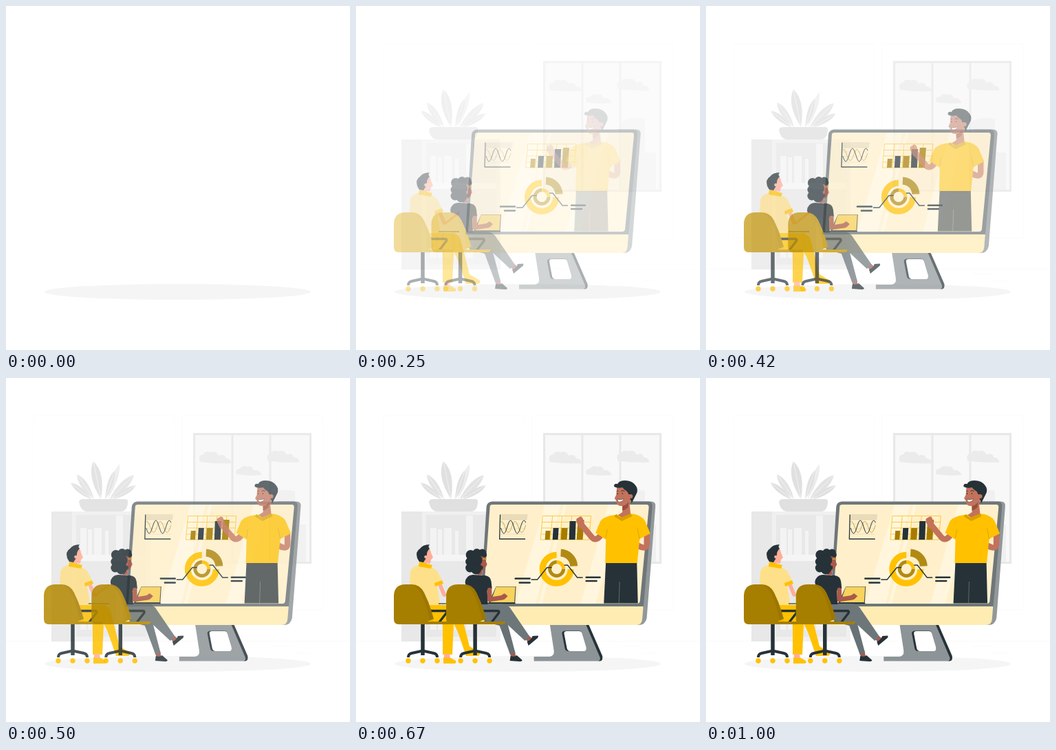
Write an HTML page that moves like this. It is 500x500 px and loops after 1040 ms.

```html
<!DOCTYPE html>
<html lang="en">
<head>
<meta charset="utf-8">
<title>Online presentation</title>
<style>
  html, body { margin: 0; width: 100%; height: 100%; overflow: hidden; background: #fff; }
  svg { display: block; width: 100%; height: 100%; }
  .line { fill: none; stroke-linecap: round; stroke-linejoin: round; }
  .ink { fill: #263238; }
  .inkLine { fill: none; stroke: #263238; stroke-linejoin: round; }
  .sun { fill: #ffc100; }
  .gold { fill: #a67c00; }
</style>
</head>
<body>
<svg viewBox="0 0 500 500">
  <defs>
    <path id="chairBody" d="M104 354H141Q141 358 136 358H62Q55 358 55 350V316Q56 300 72 300H81Q93 300 99 312Q106 326 110 340L113 350Z"/>
    <g id="chair">
      <path class="inkLine" stroke-width="5.5" d="M97 356V403"/>
      <path class="inkLine" stroke-width="4" d="M76 406Q76 401 81 400L97 396.500L113 400Q118 401 118 406"/>
      <g class="sun"><circle cx="76" cy="411" r="3.7"/><circle cx="97" cy="411" r="3.7"/><circle cx="118" cy="411" r="3.7"/></g>
      <path class="inkLine" stroke-width="3.4" d="M104 338.500H130Q133 339 131 342L121 355"/>
      <use href="#chairBody" class="sun"/>
      <g class="shade" fill-opacity=".35">
        <use href="#chairBody"/>
        <path fill-opacity=".06" d="M80 300Q93 300 99 312Q106 326 110 340L113 350V354H108Q100 320 92 309Q87 302 80 300Z"/>
      </g>
    </g>
  </defs>

  <ellipse cx="249.500" cy="415.500" rx="193.500" ry="11.500" fill="#f5f5f5"/>

  <g id="room">
    <g fill="none" stroke="#ebebeb" stroke-width=".25">
      <path d="M0 382.500H500M388 389.500H413M416 400H442"/>
      <path d="M40 337V55H245V337ZM256 337V55H461V337Z"/>
    </g>
    <rect x="273.500" y="81.500" width="169" height="187" fill="#f8f8f8" stroke="#e8e8e8" stroke-width="3.200"/>
    <path fill="#f0f0f0" d="M386 267V168Q398 160 420 164V213H436V267Z"/>
    <path stroke="#e8e8e8" stroke-width="3" d="M329 82V268M384 82V268"/>
    <g fill="#ebebeb">
      <path id="cloud" d="M282 122Q278 112 287 111Q290 105 297 108Q306 105 309 113Q318 109 320 117Q327 117 328 124Q305 125 282 122Z"/>
      <use href="#cloud" x="98.500" y="-1.500"/>
      <path d="M335 140Q332 132 340 132Q344 126 351 129Q358 127 360 134Q367 132 372 141Q354 143 335 140Z"/>
    </g>
    <path fill="#f0f0f0" d="M96 194H210V383H96Z"/>
    <path fill="#e8e8e8" d="M66 194H96V383H66ZM102 199H204V257H102ZM102 266H204V376H102Z"/>
    <g id="books" fill="#f3f3f3">
      <path d="M108 218H117V257H108ZM119 220H125V257H119ZM128 218H139V257H128ZM144 222H149V257H144ZM160 200H170V257H160Z"/>
    </g>
    <use href="#books" y="109"/>
    <path fill="#f5f5f5" d="M101 257H204V266H101Z"/>
    <g id="leaves"></g>
    <path fill="#e0e0e0" d="M106 180Q107 176 112 176H173Q178 176 177 181Q176 194 167 194H117Q108 193 106 180Z"/>
  </g>

  <g id="computer">
    <path fill="#8d9497" d="M281 357H335L357 406Q358 411.500 353 411.500H258V405H281Q288 404 287 396Z"/>
    <path class="ink" d="M333 357H337L357.500 404Q359 412 352 411.500Q355 410 354 406Z"/>
    <path class="ink" d="M303 367.500H324Q327 367 328 371L334 391Q335 397 331 397H308Q304 397 303 393L299 372Q298 368 303 367.500Z"/>
    <path fill="#fff" d="M306 368H324Q327 368 328 371L334 391Q335 397 331 397H311Q307 397 306 393L302 372Q301 368 306 368Z"/>

    <path fill="#92989a" d="M400 179.500H429Q436 180 434.500 188L422 349Q420 359 410 359H395Z"/>
    <path fill="#6f7679" d="M197 179.500H425Q431 180 430 188L417 334H180L189 187Q190 180 197 179.500Z"/>
    <path fill="#ffecb3" d="M180 332H417L415.500 350Q415 359 407 359H180Z"/>
    <path fill="#fff0cb" d="M198 184H422Q425 184 425 188L412 325Q411 328 408 328H184L194 187Q194 184 198 184Z"/>
    <path fill="#fff" fill-opacity=".35" d="M274 184H297L261 328H231ZM301 184H306L270 328H265ZM366 184H388L348 328H326Z"/>

    <path stroke="#e3d7b6" stroke-width=".7" d="M210 206H247M210 212H246M210 219H246M209 227H245"/>
    <path fill="#b8ad90" fill-opacity=".3" d="M210 198H249L248 206H210Z"/>
    <path id="waveSoft" class="line" stroke="#a67c00" stroke-width=".6"/>
    <path id="waveDark" class="line" stroke="#263238" stroke-width="1"/>
    <path class="inkLine" stroke-width="1.300" d="M209 198.500L208 234H245.500"/>

    <path class="line" stroke="#ffc93a" stroke-width="1" d="M271 200.500H341L338 235H268ZM270 209.500H340M269.500 218H339.500M269 227H339M285 201L282 235M299 201L296 235M313 201L310 235M327 201L324 235"/>
    <path class="gold" d="M275 222H282L281 235H274ZM298 218H307L306 235H297ZM322 206H331L329 235H320Z"/>
    <path class="ink" d="M286 218H294L293 235H285ZM310 208H319L318 235H309Z"/>

    <g fill="none">
      <path stroke="#ffc100" stroke-width="9" d="M291 257.300A20.500 20.500 0 1 0 311.500 278"/>
      <path stroke="#b18a14" stroke-width="11" d="M297 254A20 20 0 0 1 316 273.500"/>
      <path stroke="#ffc100" stroke-width="5" d="M291 267.500A10 10 0 0 1 301 277.500"/>
      <path stroke="#b18a14" stroke-width="5" d="M301 277.500A10 10 0 1 1 291 267.500"/>
      <path stroke="#263238" stroke-width="1.400" d="M254 293H263L277 275.500H284M302 272H307L321 290H329"/>
      <path stroke="#263238" stroke-width="2.400" stroke-linecap="round" d="M231 291.500H252M237 297.500H252M334 289.700H354M334 295H349"/>
    </g>

    <g id="speaker">
      <path class="ink" d="M362 266H407L408.500 327.500H359Z"/>
      <path stroke="#77817f" stroke-width=".7" d="M382 296L381 327"/>
      <g class="line" stroke="#c3725c" stroke-width="8.500">
        <path d="M355 228Q348 238 342 232L327 214"/>
        <path d="M421.500 225V242Q421 248 414 246L396 238"/>
      </g>
      <path fill="#c3725c" d="M320 211Q317 204 322 203Q327 199 329 206L331 214L324 219ZM385 236Q386 231 392 232L399 235V242L391 240Q385 240 385 236Z"/>
      <path class="sun" d="M375 199L397 197Q413 198 419 208L426.500 226L411 234L407.500 269H361L362 235L347 225L354 208Q359 201 375 199Z"/>
      <path class="line" stroke="#d9a400" stroke-width=".9" d="M411 234L408 219M362 232L364 220"/>
      <path fill="#c3725c" d="M378 158H395L399 173L396.500 184L398 199Q388 208 380 199L386 195V186Q377 187 377 178L374.500 175L377 170Z"/>
      <path fill="#96503f" d="M386 186Q392 185 395 180L394 188Q389 193 386 192Z"/>
      <path fill="#d99f00" d="M377 198L383 203L398 197L400 201L385 208L374 201Z"/>
      <path class="ink" d="M374 158Q373 153 379 154Q381 149 390 149Q400 149 405 156Q410 162 406 169L399.500 182L397 175Q400 169 395 169L393 165Q388 162 386 159Q379 161 374 158Z"/>
      <circle cx="398" cy="172" r="3" fill="#c3725c"/>
      <path fill="#fff" stroke="#263238" stroke-width=".5" d="M378.500 176Q383 178 388 175.500Q386 181 380 180Z"/>
      <path class="inkLine" stroke-width="1" d="M378 164.500L380 164M384 164.500Q386 162.500 389 164.500M379 167V169M386 167V169"/>
    </g>
  </g>

  <g id="man">
    <path class="line" stroke="#ffad97" stroke-width="5.500" d="M121 298L128 315"/>
    <path class="line" stroke="#ffad97" stroke-width="3" d="M130 316L149 301"/>
    <path fill="#ffad97" d="M100 249Q108 245 109 254L112 261L109 264L108 269Q105 271 103 268V275L93 272V260Z"/>
    <path class="ink" d="M89 262Q86 252 93 248Q97 242 107 242Q104 245 107 248Q102 252 103 260L98 268L92 267Z"/>
    <circle cx="101.500" cy="260" r="2.300" fill="#ffad97"/>
    <path fill="#ffe08a" d="M79 281Q82 273 93 271L108 275Q117 277 120 284L127 299L118 302L123 332H88L78 301Z"/>
    <path class="sun" d="M92 267L111 272L109 277L91 274ZM114 298L125 294L127 299L115 303Z"/>
    <path class="inkLine" stroke-width="1.200" d="M120 328H150"/>
    <path class="sun" d="M104 330H141Q150 331 153 343L165 390L180 399Q181 404 176 404H160L148 369L142 357L140 402H126V358H104Z"/>
    <path fill="#ffad97" d="M128 401H136L137 408H128Z"/>
    <path class="sun" d="M127 406Q134 408 138 407L145 411Q147 415 142 415H127Z"/>
    <use href="#chair"/>
  </g>

  <g id="woman">
    <path fill="#3f494e" d="M203 303H232L230.500 327H192Z"/>
    <path fill="#f7d25c" d="M203 303.500H231L229.500 326H195Z"/>
    <path class="inkLine" stroke-width="1.300" d="M188 327.500H231"/>
    <path fill="#a9594b" d="M222 397L230 396L232 406H225ZM244 378L250 374L256 379L250 384Z"/>
    <path class="ink" d="M224 404Q230 406 233 403L241 410Q241 412 237 412L223 411ZM248 383Q254 381 256 375L264 374.500Q265 377 262 379L250 389Z"/>
    <path fill="#687276" d="M186 339H214Q217 348 220 358L231 400L223.500 402L208 360L186 354Z"/>
    <path fill="#6d777a" d="M181 328H211Q221 328.500 226 338L252 376L245 382L217 356L185 352Z"/>
    <path class="ink" d="M158 297Q159 287 169 286L187 287Q195 288 196 296L197 306L190 309L191 329H166Z"/>
    <path class="line" stroke="#a9594b" stroke-width="6.500" d="M193.500 308V322L213 319"/>
    <path fill="#a9594b" d="M209 317L215 313L220 317L216 321L209 323Z"/>
    <path fill="#a9594b" d="M178 256Q188 255 187 263L190 271L186 278L183 280V286L176 287Z"/>
    <g id="curls" class="ink"></g>
    <circle cx="183" cy="271" r="2.300" fill="#a9594b"/>
    <path class="line" stroke="#ffc100" stroke-width="1" d="M184 263H189"/>
    <use href="#chair" x="75.500"/>
  </g>
</svg>
<script>
const LOOP = 1040, STEP = 1000 / 24;
const get = id => document.getElementById(id);
const clamp = v => Math.max(0, Math.min(1, v));

// A pointed leaf from root to tip with a pale midrib.
function leaf(x, y, tx, ty, width, tone) {
  const length = Math.hypot(tx - x, ty - y);
  const nx = (y - ty) / length * width, ny = (tx - x) / length * width;
  const mx = x + (tx - x) * .65, my = y + (ty - y) * .65;
  return `<path fill="${tone}" d="M${x} ${y}Q${mx + nx} ${my + ny} ${tx} ${ty}Q${mx - nx} ${my - ny} ${x} ${y}"/>
    <path stroke="#f5f5f5" stroke-width=".8" d="M${x} ${y}L${tx} ${ty}"/>`;
}
get('leaves').innerHTML = [
  [148, 176, 165, 125, 8, '#ebebeb'], [138, 176, 127, 121, 14, '#e0e0e0'],
  [128, 176, 103, 140, 10, '#e3e3e3'], [125, 177, 94, 152, 8, '#e0e0e0'],
  [144, 177, 158, 134, 8, '#e0e0e0'], [150, 177, 186, 141, 11, '#e3e3e3'],
  [154, 177, 189, 156, 8, '#e0e0e0']
].map(a => leaf(...a)).join('');

get('curls').innerHTML = [
  [166, 257, 7], [175, 254, 6], [183, 254, 5.5], [165, 267, 6.5], [174, 265, 9],
  [165, 276, 6.5], [174, 278, 7.5], [179, 275, 5], [186, 257, 3.5]
].map(([x, y, r]) => `<circle cx="${x}" cy="${y}" r="${r}"/>`).join('');

function wave(id, phase, height) {
  let d = '';
  for (let x = 0; x <= 36; x++) {
    d += `${x ? 'L' : 'M'}${210 + x} ${(216.5 + height * Math.sin(x / 19.5 * 2 * Math.PI + phase)).toFixed(1)}`;
  }
  get(id).setAttribute('d', d);
}
wave('waveDark', .2, 9.5);
wave('waveSoft', -1.9, 8);

const shades = document.querySelectorAll('.shade');

function draw(time) {
  const step = Math.floor((time + 5) / STEP);
  const fade = step < 2 ? 0 : clamp((step - 1) / 13);
  const ramp = step - 14.4;
  const slide = (ramp < 0 ? 2.46 * ramp : 2 * Math.sin(Math.PI * ramp / 10.6)) - .3;
  const shift = `translate(${slide.toFixed(2)} 0)`;

  get('room').setAttribute('opacity', fade ** .8);
  for (const id of ['man', 'computer', 'woman', 'speaker']) get(id).setAttribute('opacity', fade);
  for (const id of ['computer', 'woman', 'speaker']) get(id).setAttribute('transform', shift);
  shades.forEach(s => s.setAttribute('opacity', fade));
}

const start = performance.now();
function tick() {
  draw((performance.now() - start) % LOOP);
  requestAnimationFrame(tick);
}
tick();
</script>
</body>
</html>
```
